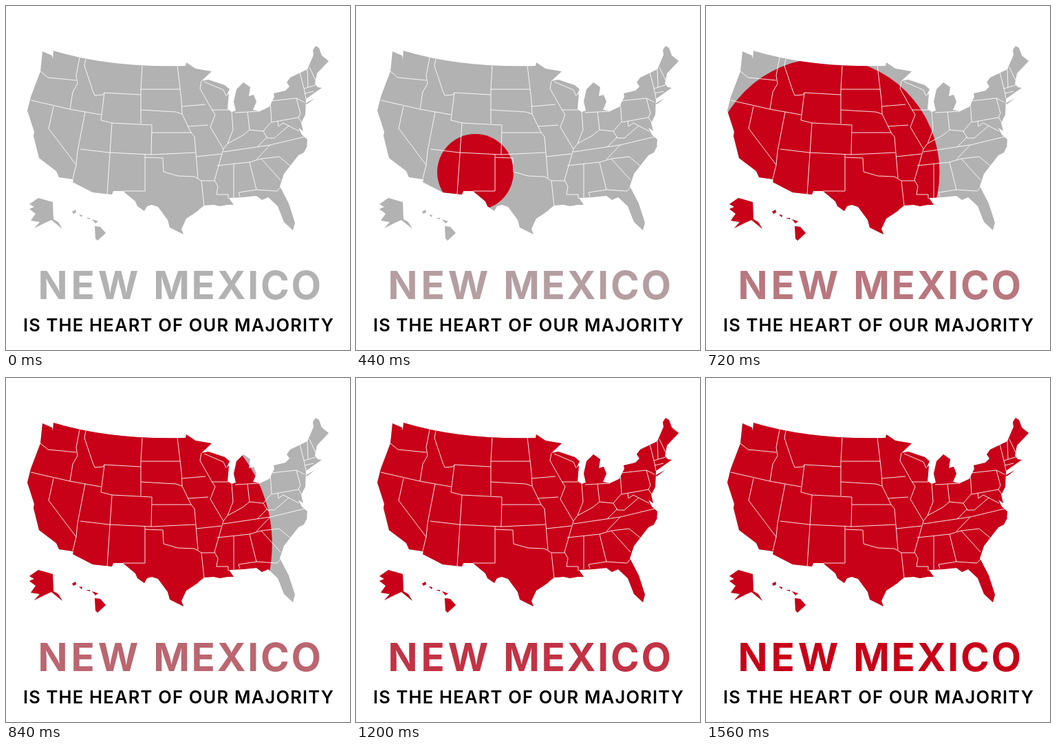
Write an HTML page that moves like this. It is 500 px wide and 500 px high and loops after 2 s.

```html
<!DOCTYPE html>
<html lang="en">
<head>
<meta charset="utf-8">
<title>New Mexico is the heart of our majority</title>
<style>
  html, body { margin: 0; width: 100%; height: 100%; overflow: hidden; background: #fff; }
  svg { display: block; width: 100%; height: 100%; }
  text { font-family: Inter, "Open Sans", sans-serif; text-anchor: middle; }
  .state { font-size: 56.5px; font-weight: 700; animation: redden 2s -2ms infinite; }
  .line { font-size: 25.5px; font-weight: 600; letter-spacing: 1.2px; }
  .spread { fill: #c80018; animation: spread 2s -2ms infinite; }
  .borders { fill: none; stroke: #fff; stroke-opacity: .88; stroke-linejoin: round; }

  /* 25 steps per second: hold, grow at a constant rate, hold */
  @keyframes spread {
    0% { r: 0; animation-timing-function: steps(1, end); }
    16% { r: 8.1px; animation-timing-function: steps(31, end); }
    78%, 100% { r: 497.4px; }
  }
  @keyframes redden {
    0% { fill: #b2b2b2; animation-timing-function: steps(1, end); }
    16% { fill: #b2afb0; animation-timing-function: steps(31, end); }
    78%, 100% { fill: #c80018; }
  }
</style>
</head>
<body>
<svg viewBox="0 0 500 500">
  <defs>
    <clipPath id="land">
      <!-- west -->
      <path d="M53 66L67 72 68 77 69 65Q152 90 261 87L262 82 280 94V297L262 309 255 324 258 332 238 322
        235 311 221 292 212 289 205 291 201 298 191 291 188 284 170 269H156L154 274 126 271 97 256 98 252
        77 249 73 240 48 221 40 189 41 183 31 152 36 132 50 95Z"/>
      <!-- lakes -->
      <path d="M270 90L299 95 284 109 294 107 318 115 325 121 320 131 324 127 322 150 328 154 334 152
        331 139 335 121 345 111 355 118 353 131 360 129 364 139 359 151 369 153 384 146V213H270Z"/>
      <!-- north-east -->
      <path d="M380 205L383 146 390 132 389 127 406 123 412 117 408 111 413 104 438 92 447 71 446 64
        450 58 455 61 459 72 469 80 452 98 449 113 453 118 459 119 453 123 436 135 435 158 429 170
        432 182 425 177 430 187 438 194 437 206Z"/>
      <!-- south-east -->
      <path d="M270 200L438 203 433 213 425 217 404 244 398 262 411 287 420 315 417 326 404 314 395 291
        381 278 372 282 364 276 344 278 324 279 331 289 322 289 311 291 302 289 288 290 270 304Z"/>
      <!-- Long Island -->
      <path d="M436 141L449 134 437 143Z"/>
      <!-- Alaska -->
      <path d="M34 288L47 279 68 285 69 310 76 314 82 324 66 311 57 315 41 323 49 314 36 312 43 302 34 295 41 292Z"/>
      <!-- Hawaii -->
      <path d="M96 299l5-3 1 4-4 2zM106 303l5 1-1 3zM116 308h6v2zM125 310l9 3-4 3z"/>
      <path d="M129 320l8 1 8 9-12 11-3-3z"/>
    </clipPath>
  </defs>

  <g clip-path="url(#land)">
    <rect width="500" height="500" fill="#b2b2b2"/>
    <circle class="spread" cx="173.5" cy="241.5" r="0"/>
    <g class="borders">
      <!-- Pacific -->
      <path d="M50 95L61 104 102 108M107 75L102 101 104 113 97 125 93 150M36 137L93 150 138 158"/>
      <path d="M69 146L62 178 102 231 97 251M115 154L104 211 102 231"/>
      <!-- Rockies -->
      <path d="M116 77L114 87 126 123 129 130 141 129 143 126 196 129M143 126L138 166 154 170 212 173"/>
      <path d="M154 170L147 274M108 208L150 213 211 216M198 87L196 121V171M202 216V269H170"/>
      <!-- Plains -->
      <path d="M196 121H253M249 86L255 137 256 157 269 184 274 190 279 250M196 151L247 154 256 157"/>
      <path d="M212 173L211 216 275 213M212 184H269M202 220L228 221 229 241 250 247 274 248 284 254 288 291"/>
      <!-- Mississippi valley -->
      <path d="M284 109L282 120 299 150 304 158 297 176 316 208 303 253 308 262 306 274H323V280"/>
      <path d="M255 146L290 143M264 175L294 173M276 219L313 215M284 254H303"/>
      <!-- Lakes and Ohio -->
      <path d="M288 110L316 122 320 131M299 151H323M328 153L330 180 322 200M333 155L369 153M351 154L354 180"/>
      <path d="M316 208L322 200 344 188 354 180 374 182 386 168 384 138"/>
      <!-- South -->
      <path d="M316 212L384 202 434 190M307 232L354 227 371 222 397 219 414 233M364 223L384 202M365 205L380 190"/>
      <path d="M331 230V278M354 227L364 267 338 271 340 277M364 267L394 269 399 263M371 222L399 253"/>
      <!-- Atlantic -->
      <path d="M374 182L380 192H390L411 174M386 169L425 162 432 172M395 167L396 175 403 170 426 182"/>
      <path d="M425 162L428 156 422 134 385 138M422 134L434 140"/>
      <!-- New England -->
      <path d="M427 96L434 124 436 135M438 92L439 118M433 120L450 115M434 127L447 124M441 89L450 108"/>
    </g>
  </g>

  <g class="state">
    <text x="122" y="426" letter-spacing="5">NEW</text>
    <text x="337.5" y="426" letter-spacing="2.8">MEXICO</text>
  </g>
  <text class="line" x="251" y="473">IS THE HEART OF OUR MAJORITY</text>
</svg>
</body>
</html>
```
